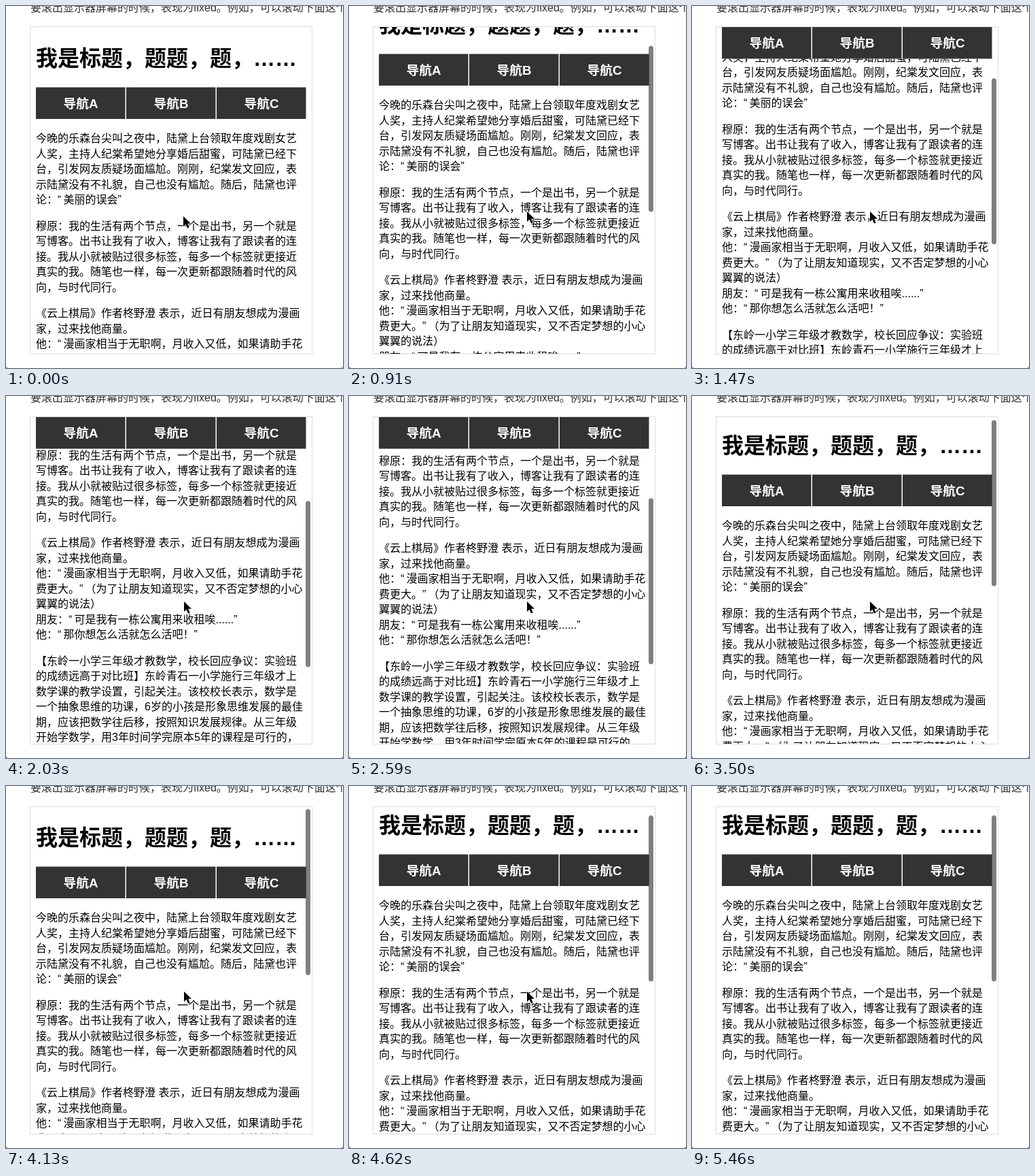
An HTML page for the animation above (5530 ms loop, 496 by 532 pixels).

```html
<!DOCTYPE html>
<html lang="zh-CN">
<head>
<meta charset="utf-8">
<title>Sticky navigation</title>
<style>
html, body { margin: 0; width: 100%; height: 100%; overflow: hidden; background: #fff; }
svg { display: block; }
text {
  font: 16px 'Liberation Sans', 'Noto Sans CJK SC', 'Noto Sans CJK', sans-serif;
  text-spacing-trim: space-all;
}
.quote { letter-spacing: 3.2px; }
.title { font-size: 32px; font-weight: 700; }
.nav text { font-size: 18.72px; font-weight: 700; fill: #fff; text-anchor: middle; }
</style>
</head>
<body>
<svg width="496" height="532" viewBox="0 0 496 532">
  <defs><clipPath id="view"><rect x="36" y="31" width="414" height="480"/></clipPath></defs>
  <rect width="496" height="532" fill="#fff"/>
  <text x="36" y="7.5" fill="#333">要滚出显示器屏幕的时候，表现为fixed。例如，可以滚动下面这个</text>
  <g clip-path="url(#view)">
    <g id="page"><text class="title" x="44" y="88">我是标题，题题，题，……</text></g>
    <g id="nav" class="nav"></g>
    <rect id="thumb" x="441" width="7" height="244" rx="3.5" fill="#000" fill-opacity=".5"/>
  </g>
  <rect x="35.5" y="30.5" width="415" height="481" fill="none" stroke="#ddd"/>
  <path d="M0 529V532H3Q.5 531.5 0 529ZM496 529V532H493Q495.5 531.5 496 529Z" fill="#888"/>
  <path id="cursor" d="M0 0V15L3.5 11.8 6 17.6 8.7 16.5 6.3 10.8H11Z"
    fill="#000" stroke="#fff" stroke-width="1.2" stroke-linejoin="round" paint-order="stroke"/>
</svg>
<script>
const LOOP = 5530, STEP = 70;
const $ = id => document.getElementById(id);

function add(parent, tag, attrs, text = '') {
  const el = document.createElementNS('http://www.w3.org/2000/svg', tag);
  for (const k in attrs) el.setAttribute(k, attrs[k]);
  el.textContent = text;
  return parent.appendChild(el);
}

const paragraphs = [
`今晚的乐森台尖叫之夜中，陆黛上台领取年度戏剧女艺
人奖，主持人纪棠希望她分享婚后甜蜜，可陆黛已经下
台，引发网友质疑场面尴尬。刚刚，纪棠发文回应，表
示陆黛没有不礼貌，自己也没有尴尬。随后，陆黛也评
论：“美丽的误会”`,
`穆原：我的生活有两个节点，一个是出书，另一个就是
写博客。出书让我有了收入，博客让我有了跟读者的连
接。我从小就被贴过很多标签，每多一个标签就更接近
真实的我。随笔也一样，每一次更新都跟随着时代的风
向，与时代同行。`,
`《云上棋局》作者柊野澄 表示，近日有朋友想成为漫画
家，过来找他商量。
他：“漫画家相当于无职啊，月收入又低，如果请助手花
费更大。”（为了让朋友知道现实，又不否定梦想的小心
翼翼的说法）
朋友：“可是我有一栋公寓用来收租唉......”
他：“那你想怎么活就怎么活吧！”`,
`【东岭一小学三年级才教数学，校长回应争议：实验班
的成绩远高于对比班】东岭青石一小学施行三年级才上
数学课的教学设置，引起关注。该校校长表示，数学是
一个抽象思维的功课，6岁的小孩是形象思维发展的最佳
期，应该把数学往后移，按照知识发展规律。从三年级
开始学数学，用3年时间学完原本5年的课程是可行的，
实验班的成绩也远高于对比班。`
];

let y = 200;
for (const p of paragraphs) {
  for (const line of p.split('\n')) {
    const row = add($('page'), 'text', { x: 44, y });
    for (const part of line.split(/([“”])/)) {
      if (part) add(row, 'tspan', /[“”]/.test(part) ? { class: 'quote' } : {}, part);
    }
    y += 22.5;
  }
  y += 16;
}

add($('nav'), 'rect', { x: 44, y: 0, width: 398, height: 46.5, fill: '#fff' });
['A', 'B', 'C'].forEach((name, i) => {
  const x = 44 + i * 133;
  add($('nav'), 'rect', { x, y: 0, width: 131.5, height: 46.5, fill: '#333' });
  add($('nav'), 'text', { x: x + 66, y: 30 }, '导航' + name);
});

// Monotone cubic through [time, value] points
function curve(pts) {
  const rate = pts.slice(1).map((p, i) => (p[1] - pts[i][1]) / (p[0] - pts[i][0]));
  const slope = pts.map((_, i) => {
    const a = rate[i - 1] || 0, b = rate[i] || 0;
    return a * b > 0 ? 2 * a * b / (a + b) : 0;
  });
  return t => {
    if (t <= pts[0][0]) return pts[0][1];
    const i = pts.findIndex(p => p[0] >= t) - 1;
    if (i < 0) return pts[pts.length - 1][1];
    const [t0, v0] = pts[i], [t1, v1] = pts[i + 1];
    const h = t1 - t0, u = (t - t0) / h, w = 1 - u;
    return w * w * (1 + 2 * u) * v0 + u * u * (3 - 2 * u) * v1
      + h * u * w * (w * slope[i] - u * slope[i + 1]);
  };
}

const scroll = curve([[560, 0], [630, 3], [910, 49], [1400, 130], [2030, 236], [2310, 252],
  [2450, 252], [2520, 243], [3010, 89], [3080, 64], [3570, 1], [3640, 0],
  [4060, 0], [4130, 1], [4620, 19], [4900, 42], [5180, 19]]);
const mouseX = curve([[0, 261], [70, 262], [5110, 262], [5180, 254], [5250, 250], [5390, 238], [5460, 230]]);
const mouseY = curve([[0, 309], [70, 302], [5180, 302], [5250, 340], [5320, 415], [5390, 497], [5460, 560]]);

function draw(time) {
  const t = Math.floor(time % LOOP / STEP) * STEP;
  const s = Math.round(scroll(t));
  $('page').setAttribute('transform', `translate(0 ${-s})`);
  $('nav').setAttribute('transform', `translate(0 ${Math.max(119.5 - s, 31)})`);
  $('thumb').setAttribute('y', 33.5 + s * 0.512);
  $('thumb').setAttribute('visibility', t < 630 ? 'hidden' : 'visible');
  $('cursor').setAttribute('transform', `translate(${mouseX(t)} ${mouseY(t)})`);
}

const start = performance.now();
function tick() {
  draw(performance.now() - start);
  requestAnimationFrame(tick);
}
tick();
</script>
</body>
</html>
```
